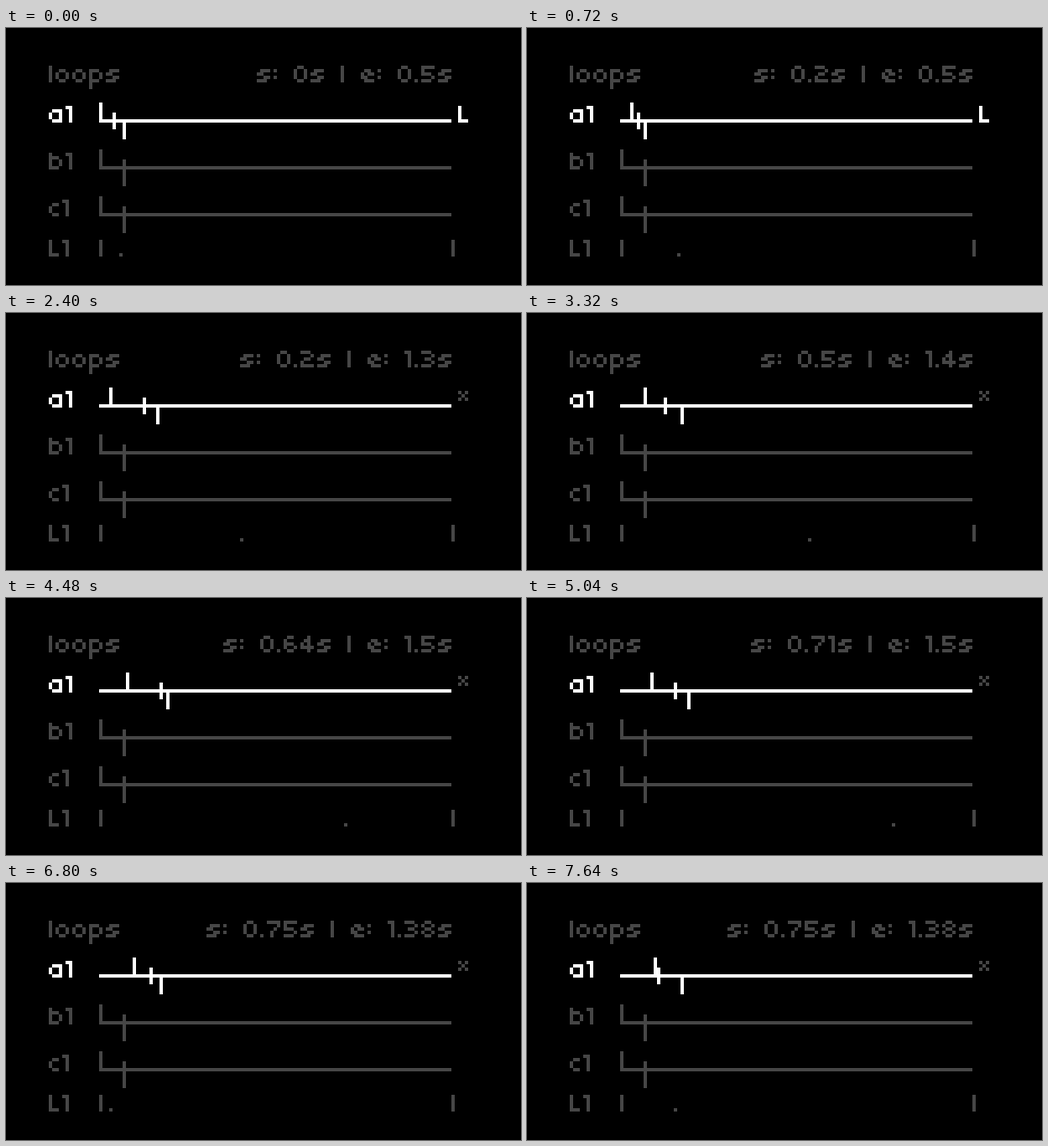
Recreate the animation shown at these times as an HTML page. Size 614 by 307 pixels, loop 7680 ms.

```html
<!DOCTYPE html>
<html lang="en">
<head>
<meta charset="utf-8">
<title>loops</title>
<style>
  html, body { margin: 0; width: 100%; height: 100%; overflow: hidden; background: #000; }
  svg { display: block; width: 100%; height: 100%; }
  path { fill: none; stroke: #464646; stroke-width: 1; stroke-linecap: square; shape-rendering: crispEdges; }
  path.on { stroke: #fff; }
</style>
</head>
<body>
<svg viewBox="0 0 614 307"><g id="screen" transform="translate(53 27) scale(4)"></g></svg>
<script>
const LOOP = 7680, FRAME = 40;
const LEFT = 15, SPAN = 105, SECONDS = 8, PX_MS = 66.6;

// Pixel typeface: [width, pen strokes on a grid whose rows 0-4 end at the baseline].
const GLYPHS = {
  ' ': [3, ''],
  l: [1, 'M0 0v4'],
  o: [4, 'M1 1h1M0 2v1M3 2v1M1 4h1'],
  p: [4, 'M0 1v5M0 1h2M0 4h2M3 2v1'],
  s: [4, 'M1 1h2M0 2h1M2 3h1M0 4h2'],
  e: [4, 'M1 1h1M0 2v1M2 2h1M1 3h0M1 4h2'],
  a: [4, 'M1 1h2v3h-2M0 2v1'],
  b: [4, 'M0 0v4h2M0 1h2M3 2v1'],
  c: [3, 'M1 1h1M0 2v1M1 4h1'],
  L: [3, 'M0 0v4h2'],
  x: [3, 'M0 0h0M2 0h0M1 1h0M0 2h0M2 2h0'],
  ':': [1, 'M0 1h0M0 3h0'],
  '.': [1, 'M0 4h0'],
  '|': [1, 'M0 0v4'],
  0: [4, 'M1 0h1M0 1v2M3 1v2M1 4h1'],
  1: [2, 'M0 0h1v4'],
  2: [4, 'M0 0h2M3 1h0M1 2h1M0 3v1h3'],
  3: [4, 'M0 0h2M3 1h0M1 2h1M3 3h0M0 4h2'],
  4: [4, 'M2 0v4M1 1h0M0 2v1h3'],
  5: [4, 'M3 0h-3v2h2M3 3h0M0 4h2'],
  6: [4, 'M1 0h1M0 1v2M1 2h1M3 3h0M0 3h0M1 4h1'],
  7: [4, 'M0 0h3v1M2 2h0M1 3v1'],
  8: [4, 'M1 0h1M0 1h0M3 1h0M1 2h1M0 3h0M3 3h0M1 4h1'],
  9: [4, 'M1 0h1M0 1h0M3 1v2M1 2h1M1 4h1']
};

const screen = document.getElementById('screen');

function addPath(d = '', bright = false) {
  const path = document.createElementNS('http://www.w3.org/2000/svg', 'path');
  path.setAttribute('d', d);
  path.classList.toggle('on', bright);
  return screen.appendChild(path);
}

const textWidth = text => [...text].reduce((w, c) => w + GLYPHS[c][0] + 1, -1);

function textPath(text, x, y) {
  let d = '';
  for (const c of text) {
    const [width, strokes] = GLYPHS[c];
    d += strokes.replace(/M(\d) (\d)/g, (_, gx, gy) => `M${x + +gx} ${y + +gy}`);
    x += width + 1;
  }
  return d;
}

function setText(path, text, x, y) {
  path.setAttribute('role', 'img');
  path.setAttribute('aria-label', text);
  path.setAttribute('d', textPath(text, x, y));
}

function addText(text, x, y, bright) {
  const path = addPath('', bright);
  setText(path, text, x, y);
  return path;
}

const vertical = (x, top, rows) => `M${x} ${top}v${rows - 1}`;
const toX = sec => LEFT + Math.round(sec * SPAN / SECONDS + 1e-6);
const trackPath = (y, start, head, end) =>
  `M${LEFT} ${y}h${SPAN - 1}` + vertical(toX(start), y - 5, 6) +
  vertical(toX(head), y - 2, 5) + vertical(toX(end), y, 6);

addText('loops', 0, 5);
addText('a1', 0, 17, true);
addText('b1', 0, 31);
addText('c1', 0, 45);
addText('L1', 0, 57);
addPath(trackPath(35, 0, 0.5, 0.5));
addPath(trackPath(49, 0, 0.5, 0.5));
addPath(vertical(LEFT, 57, 5) + vertical(LEFT + SPAN, 57, 5));
const status = addPath();
const track = addPath('', true);
const mode = addPath();
const dot = addPath();

// Encoder clicks so far: one every `gap` ms after `from`, at most `max`.
const clicks = (t, from, gap, max) =>
  Math.max(0, Math.min(max, Math.floor((t - from) / gap)));

const startAt = t =>
  0.1 * (clicks(t, -80, 240, 2) + clicks(t, 2700, 150, 3) + clicks(t, 3450, 150, 1)) +
  0.01 * clicks(t, 4170, 75, 15);

const endAt = t =>
  0.5 + 0.1 * (clicks(t, 670, 255, 3) + clicks(t, 1550, 150, 5) +
               clicks(t, 2550, 150, 1) + clicks(t, 3350, 150, 1)) -
  0.01 * clicks(t, 5330, 85, 12);

// Playhead runs at constant speed and jumps back from the loop end to its start.
function headAt(t) {
  const step = 4, advance = step / PX_MS * SECONDS / SPAN;
  let pos = 0.27;
  for (let now = step; now <= t; now += step) {
    pos += advance;
    const end = endAt(now);
    if (pos >= end) pos += startAt(now) - end;
  }
  return pos;
}

const label = sec => Number(sec.toFixed(2)) + 's';

function render(t) {
  const start = startAt(t), end = endAt(t);
  const text = `s: ${label(start)} | e: ${label(end)}`;
  setText(status, text, LEFT + SPAN - textWidth(text), 5);
  track.setAttribute('d', trackPath(21, start, headAt(t), end));

  const looping = t < 2040;
  setText(mode, looping ? 'L' : 'x', 122, 17);
  mode.classList.toggle('on', looping);

  const dotX = LEFT + Math.floor((t + 418.8) / PX_MS) % SPAN;
  dot.setAttribute('d', `M${dotX} 61h0`);
}

const origin = performance.now();
function tick() {
  const t = (performance.now() - origin) % LOOP;
  render(Math.floor(t / FRAME) * FRAME);
  requestAnimationFrame(tick);
}
tick();
</script>
</body>
</html>
```
